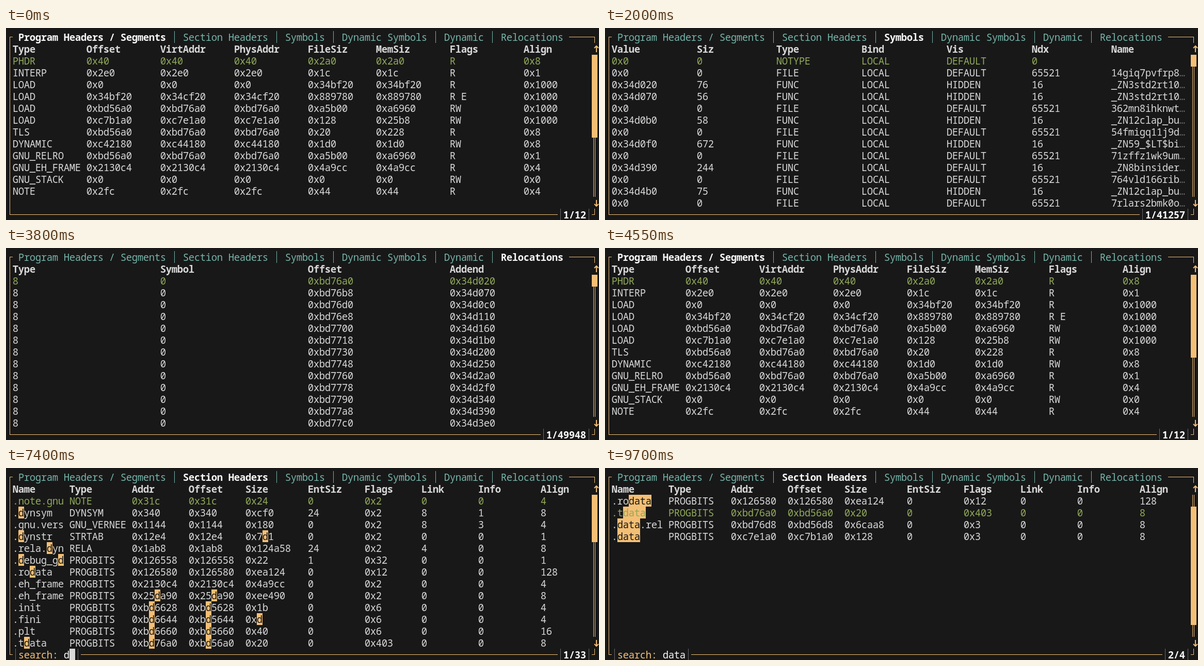
An HTML page with a canvas for the animation above (10 s loop, 1149x373 px).

```html
<!DOCTYPE html>
<html lang="en">
<head>
<meta charset="utf-8">
<title>ELF viewer</title>
<style>
  html, body { margin: 0; width: 100%; height: 100%; overflow: hidden; background: #181818; }
  canvas { display: block; }
</style>
</head>
<body>
<canvas id="terminal" width="1149" height="373"></canvas>
<script>
const ctx = document.getElementById('terminal').getContext('2d');
const COLOR = {
  bg: '#181818', text: '#d8d8d8', white: '#f8f8f8', dim: '#6b6b6b',
  green: '#90a959', yellow: '#f4bf75', cyan: '#75b5aa'
};
const LOOP = 10000, CELL_W = 11, CELL_H = 23, RIGHT = 103, BOTTOM = 15;
const VISIBLE_ROWS = 13, TRACK_ROWS = 12, VIEWPORT = 14;

// One line per row; "~" stands for a blank inside a cell.
const parseRows = text => text.trim().split('\n')
  .map(line => line.trim().split(/\s+/).map(cell => cell.replace('~', ' ')));

const segments = parseRows(`
  PHDR 0x40 0x40 0x40 0x2a0 0x2a0 R 0x8
  INTERP 0x2e0 0x2e0 0x2e0 0x1c 0x1c R 0x1
  LOAD 0x0 0x0 0x0 0x34bf20 0x34bf20 R 0x1000
  LOAD 0x34bf20 0x34cf20 0x34cf20 0x889780 0x889780 R~E 0x1000
  LOAD 0xbd56a0 0xbd76a0 0xbd76a0 0xa5b00 0xa6960 RW 0x1000
  LOAD 0xc7b1a0 0xc7e1a0 0xc7e1a0 0x128 0x25b8 RW 0x1000
  TLS 0xbd56a0 0xbd76a0 0xbd76a0 0x20 0x228 R 0x8
  DYNAMIC 0xc42180 0xc44180 0xc44180 0x1d0 0x1d0 RW 0x8
  GNU_RELRO 0xbd56a0 0xbd76a0 0xbd76a0 0xa5b00 0xa6960 R 0x1
  GNU_EH_FRAME 0x2130c4 0x2130c4 0x2130c4 0x4a9cc 0x4a9cc R 0x4
  GNU_STACK 0x0 0x0 0x0 0x0 0x0 RW 0x0
  NOTE 0x2fc 0x2fc 0x2fc 0x44 0x44 R 0x4`);

const sections = parseRows(`
  ~ NULL 0x0 0x0 0x0 0 0x0 0 0 0
  .interp PROGBITS 0x2e0 0x2e0 0x1c 0 0x2 0 0 1
  .note.ABI-tag NOTE 0x2fc 0x2fc 0x20 0 0x2 0 0 4
  .note.gnu.build-id NOTE 0x31c 0x31c 0x24 0 0x2 0 0 4
  .dynsym DYNSYM 0x340 0x340 0xcf0 24 0x2 8 1 8
  .gnu.version GNU_VERSYM 0x1030 0x1030 0x114 2 0x2 4 0 2
  .gnu.version_r GNU_VERNEED 0x1144 0x1144 0x180 0 0x2 8 3 4
  .gnu.hash GNU_HASH 0x12c8 0x12c8 0x1c 0 0x2 4 0 8
  .dynstr STRTAB 0x12e4 0x12e4 0x7d1 0 0x2 0 0 1
  .rela.dyn RELA 0x1ab8 0x1ab8 0x124a58 24 0x2 4 0 8
  .rela.plt RELA 0x126510 0x126510 0x48 24 0x42 4 27 8
  .debug_gdb_scripts PROGBITS 0x126558 0x126558 0x22 1 0x32 0 0 1
  .rodata PROGBITS 0x126580 0x126580 0xea124 0 0x12 0 0 128
  .eh_frame_hdr PROGBITS 0x2130c4 0x2130c4 0x4a9cc 0 0x2 0 0 4
  .eh_frame PROGBITS 0x25da90 0x25da90 0xee490 0 0x2 0 0 8
  .init PROGBITS 0xbd6628 0xbd5628 0x1b 0 0x6 0 0 4
  .fini PROGBITS 0xbd6644 0xbd5644 0xd 0 0x6 0 0 4
  .plt PROGBITS 0xbd6660 0xbd5660 0x40 0 0x6 0 0 16
  .tdata PROGBITS 0xbd76a0 0xbd56a0 0x20 0 0x403 0 0 8
  .data.rel.ro PROGBITS 0xbd76d8 0xbd56d8 0x6caa8 0 0x3 0 0 8
  .data PROGBITS 0xc7e1a0 0xc7b1a0 0x128 0 0x3 0 0 8`);

const nullSymbol = ['0x0', '0', 'NOTYPE', 'LOCAL', 'DEFAULT', '0', ''];
const fileSymbol = name => ['0x0', '0', 'FILE', 'LOCAL', 'DEFAULT', '65521', name + '…'];
const funcSymbol = (value, size, name, vis = 'HIDDEN') =>
  [value, size, 'FUNC', 'LOCAL', vis, '16', name + '…'];
const symbols = [
  nullSymbol,
  fileSymbol('14giq7pvfrp8'),
  funcSymbol('0x34d020', '76', '_ZN3std2rt10'),
  funcSymbol('0x34d070', '56', '_ZN3std2rt10'),
  fileSymbol('362mn8ihknwt'),
  funcSymbol('0x34d0b0', '58', '_ZN12clap_bu'),
  fileSymbol('54fmigq11j9d'),
  funcSymbol('0x34d0f0', '672', '_ZN59_$LT$bi'),
  fileSymbol('71zffz1wk9um'),
  funcSymbol('0x34d390', '244', '_ZN8binsider', 'DEFAULT'),
  fileSymbol('764vld166rib'),
  funcSymbol('0x34d4b0', '75', '_ZN12clap_bu'),
  fileSymbol('7rlars2bmk0o')
];
const imports = ['__libc_start…', '__gmon_start…', '_ITM_deregis…', '_ITM_registe…',
  '__cxa_finali…', '_Unwind_Resu…', 'memcpy', 'memmove', 'memset', 'bcmp', 'strlen', 'free'];
const dynamicSymbols = [nullSymbol, ...imports.map((name, i) => {
  const weak = i > 0 && i < 5;
  return ['0x0', '0', weak && i < 4 ? 'NOTYPE' : 'FUNC', weak ? 'WEAK' : 'GLOBAL', 'DEFAULT', '0', name];
})];

const dynamicTags = parseRows(`
  NEEDED 0x6CE
  NEEDED 0x6F6
  NEEDED 0x7BC
  FLAGS 0x8
  FLAGS_1 0x8000001
  DEBUG 0x0
  RELA 0x1AB8
  RELASZ 0x124A58
  RELAENT 0x18
  RELACOUNT 0xC292
  JMPREL 0x126510
  PLTRELSZ 0x48
  PLTGOT 0xC7D170`);

const hex = n => '0x' + n.toString(16);
const relocations = Array.from({ length: VISIBLE_ROWS }, (_, i) =>
  ['8', '0', hex(0xbd76a0 + i * 24), hex(0x34d020 + i * 80)]);

const makeTab = (title, heads, rows, count) => ({ title, heads: heads.split(' '), rows, count });
const symbolHeads = 'Value Siz Type Bind Vis Ndx Name';
const tabs = [
  makeTab('Program Headers / Segments', 'Type Offset VirtAddr PhysAddr FileSiz MemSiz Flags Align', segments, 12),
  makeTab('Section Headers', 'Name Type Addr Offset Size EntSiz Flags Link Info Align', sections, 45),
  makeTab('Symbols', symbolHeads, symbols, 41257),
  makeTab('Dynamic Symbols', symbolHeads, dynamicSymbols, 138),
  makeTab('Dynamic', 'Tag Value', dynamicTags, 29),
  makeTab('Relocations', 'Type Symbol Offset Addend', relocations, 49948)
];

const timeline = [
  { at: 0, tab: 0 },
  { at: 950, tab: 1 },
  { at: 2000, tab: 2 },
  { at: 2300, tab: 3 },
  { at: 2750, tab: 4 },
  { at: 3750, tab: 5 },
  { at: 4500, tab: 0 },
  { at: 5600, tab: 1 },
  { at: 7000, tab: 1, query: '', typing: true },
  { at: 7400, tab: 1, query: 'd', typing: true, count: 33 },
  { at: 7650, tab: 1, query: 'da', typing: true, count: 5 },
  { at: 8000, tab: 1, query: 'dat', typing: true, count: 4 },
  { at: 8400, tab: 1, query: 'data', typing: true, count: 4 },
  { at: 9200, tab: 1, query: 'data', count: 4 },
  { at: 9650, tab: 1, query: 'data', count: 4, selected: 1 }
];

const cellX = col => 2 + col * CELL_W;
const cellY = row => 6 + row * CELL_H;
const midX = col => cellX(col) + 5;
const midY = row => cellY(row) + 11;

function fillBox(x, y, w, h, color) {
  ctx.fillStyle = color;
  ctx.fillRect(x, y, w, h);
}

function fillCells(col, row, count, color) {
  fillBox(cellX(col), cellY(row), count * CELL_W, CELL_H, color);
}

function drawBar(col, row, color) {
  fillBox(midX(col), cellY(row), 1, CELL_H, color);
}

function drawText(text, col, row, color, bold = false) {
  ctx.font = `${bold ? 'bold ' : ''}19px "Noto Sans Mono", monospace`;
  [...text].forEach((char, i) => {
    ctx.fillStyle = char === '…' ? COLOR.dim : color;
    ctx.fillText(char, cellX(col + i) + CELL_W / 2, cellY(row) + 19);
  });
}

function drawArrow(row, direction) {
  const x = midX(RIGHT) + 4, y = midY(row) + 1, tip = y + 6 * direction;
  ctx.strokeStyle = COLOR.yellow;
  ctx.lineWidth = 2;
  ctx.beginPath();
  ctx.moveTo(x, y - 6 * direction);
  ctx.lineTo(x, tip);
  ctx.moveTo(x - 4, tip - 4 * direction);
  ctx.lineTo(x, tip);
  ctx.lineTo(x + 4, tip - 4 * direction);
  ctx.stroke();
}

function drawTabs(active) {
  let col = 2;
  tabs.forEach(({ title }, i) => {
    if (i) {
      drawBar(col + 1, 0, COLOR.cyan);
      col += 3;
    }
    drawText(title, col, 0, i === active ? COLOR.white : COLOR.cyan, i === active);
    col += title.length;
  });
  return col + 1;
}

// Draws the search prompt and returns the first column after it.
function drawSearch(query, typing) {
  const end = 10 + query.length, close = typing ? end + 1 : end;
  drawBar(1, BOTTOM, COLOR.dim);
  drawText('search:', 2, BOTTOM, COLOR.yellow);
  drawText(query, 10, BOTTOM, COLOR.white);
  if (typing) fillCells(end, BOTTOM, 1, COLOR.text);
  drawBar(close, BOTTOM, COLOR.dim);
  return close + 1;
}

function drawBorder(titleEnd, label, { query, typing }) {
  const color = COLOR.yellow;
  const x0 = midX(0), x1 = midX(RIGHT), y0 = midY(0), y1 = midY(BOTTOM);
  const horizontal = (from, to, y) => fillBox(from, y, to - from, 1, color);
  const vertical = (x, from, to) => fillBox(x, from, 1, to - from, color);
  const labelCol = 102 - label.length;

  vertical(x0, y0, y1 + 1);
  horizontal(x0, cellX(1), y0);
  horizontal(x0, cellX(1), y1);
  horizontal(cellX(titleEnd), x1 + 1, y0);
  vertical(x1, y0, cellY(1));
  vertical(x1, cellY(BOTTOM), y1 + 1);
  horizontal(cellX(RIGHT), x1 + 1, y1);

  const lineStart = query === undefined ? 1 : drawSearch(query, typing);
  horizontal(cellX(lineStart), cellX(labelCol - 1), y1);
  drawBar(labelCol - 1, BOTTOM, COLOR.dim);
  drawText(label, labelCol, BOTTOM, COLOR.white, true);
  drawBar(102, BOTTOM, COLOR.dim);
}

function drawScrollbar(count, position) {
  const scale = TRACK_ROWS / (count - 1 + VIEWPORT);
  const start = Math.round(position * scale);
  const end = Math.max(start + 1, Math.round((position + VIEWPORT) * scale));
  for (const x of [1138, 1141]) fillBox(x, cellY(2), 1, TRACK_ROWS * CELL_H, COLOR.yellow);
  fillBox(cellX(RIGHT), cellY(2 + start), CELL_W, (end - start) * CELL_H, COLOR.yellow);
  drawArrow(1, -1);
  drawArrow(14, 1);
}

function drawCell(text, col, row, query, selected) {
  drawText(text, col, row, selected ? COLOR.green : COLOR.text);
  if (!query) return;
  for (let i = text.indexOf(query); i >= 0; i = text.indexOf(query, i + query.length)) {
    fillCells(col + i, row, query.length, COLOR.yellow);
    drawText(query, col + i, row, selected ? COLOR.green : COLOR.bg);
  }
}

function drawTable({ heads, rows }, query, selected) {
  const column = i => Math.round(1 + 103 * i / heads.length);
  const matches = row => !query || row.some(cell => cell.toLowerCase().includes(query));
  heads.forEach((head, i) => drawText(head, column(i), 1, COLOR.text, true));
  rows.filter(matches).slice(0, VISIBLE_ROWS).forEach((row, r) => {
    row.forEach((cell, i) => {
      const width = column(i + 1) - column(i) - 1;
      drawCell(cell.slice(0, width), column(i), r + 2, query, r === selected);
    });
  });
}

function draw(time) {
  const state = timeline.findLast(step => step.at <= time);
  const current = tabs[state.tab];
  const { query, selected = 0, count = current.count } = state;
  fillBox(0, 0, 1149, 373, COLOR.bg);
  ctx.textAlign = 'center';
  const titleEnd = drawTabs(state.tab);
  drawBorder(titleEnd, `${selected + 1}/${count}`, state);
  drawTable(current, query, selected);
  drawScrollbar(count, selected);
}

const startTime = performance.now();
function tick() {
  draw((performance.now() - startTime) % LOOP);
  requestAnimationFrame(tick);
}
tick();
</script>
</body>
</html>
```
